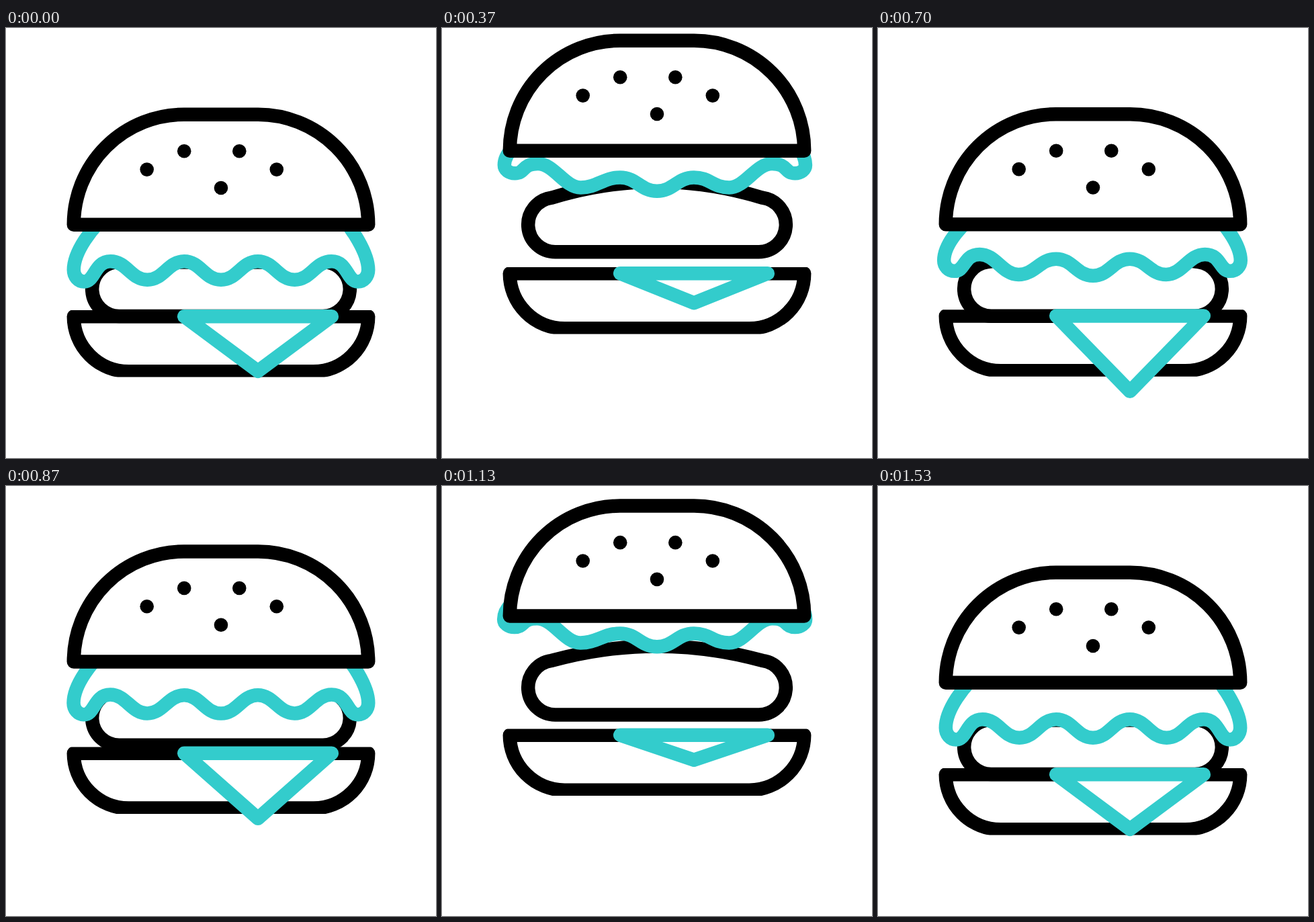
Recreate the animation shown at these times as an HTML page. Size 640 px wide and 640 px high, loop 2 s.

```html
<!DOCTYPE html>
<html>
<head>
<meta charset="utf-8">
<style>
  html, body { margin: 0; height: 100%; overflow: hidden; background: #fff; }
  svg { display: block; width: 100vw; height: 100vh; }
  .line { fill: #fff; stroke: #000; stroke-width: 20.5; stroke-linejoin: round; }
  .teal { stroke: #33cccc; }
</style>
</head>
<body>
<svg viewBox="0 0 640 640">
  <clipPath id="trim"><rect y="420" width="640" height="99.6"/></clipPath>
  <g id="base">
    <path class="line" clip-path="url(#trim)"
      d="M100.8 429.3H539.2A82 82 0 0 1 457.4 511.2H182.6A82 82 0 0 1 100.8 429.3Z"/>
  </g>
  <path id="patty" class="line"/>
  <path id="cheese" class="line teal"/>
  <path id="lettuce" class="line teal"/>
  <g id="bun">
    <path class="line" d="M100.8 292.7A164 164 0 0 1 264.8 128.7H375.2A164 164 0 0 1 539.2 292.7Z"/>
    <circle cx="265.2" cy="183.3" r="10.3"/>
    <circle cx="347.3" cy="183.3" r="10.3"/>
    <circle cx="209.7" cy="210.6" r="10.3"/>
    <circle cx="402.8" cy="210.6" r="10.3"/>
    <circle cx="320" cy="238" r="10.3"/>
  </g>
</svg>
<script>
const LOOP = 2000, FPS = 30, START = 2;
const $ = id => document.getElementById(id);

// Two hops: up and down bound the first top, land parts the hops, end is the final rest.
const hops = {
  base:    { high: -64, up: 11, down: 11.1, land: 20.2, end: 43.6 },
  patty:   { high: -96, up: 11.3, land: 20.7, end: 43.4 },
  lettuce: { high: -136.5, up: 12.1, down: 12.7, land: 22.2, end: 44.7 },
  bun:     { high: -110, again: -99.3, up: 10, down: 11, land: 21.4, end: 46 },
  bulge:   { high: 24, up: 10, down: 16, land: 26, end: 46 },
  flare:   { high: 1, up: 13.4, down: 14, land: 24.9, end: 45.4 },
  droop:   { high: -44.5, dip: 35.5, up: 14, land: 22.2, end: 45.5 }
};

function ease(step, t0, t1, a, b) {
  const x = (step - t0) / (t1 - t0);
  return a + (b - a) * x * x * (3 - 2 * x);
}

function hop(step, { high, again = high, dip = 0, up, down = up, land, end }) {
  const mid = (land + end) / 2;
  if (step <= START || step >= end) return 0;
  if (step < up) return ease(step, START, up, 0, high);
  if (step < down) return high;
  if (step < land) return ease(step, down, land, high, dip);
  if (step < mid) return ease(step, land, mid, dip, again);
  return ease(step, mid, end, again, 0);
}

// Knots run from -4 (left tip) to 4 (right tip); flaring lifts and spreads the outer ones.
function knot(k, flare) {
  const n = Math.abs(k), tip = n === 4;
  const lift = [0, 8, -6, -15, -33][n];
  const spread = [0, 0, 1, 11, 5.5][n];
  const lean = n > 1 ? -3.5 : 0;
  return {
    x: 320 + Math.sign(k) * ((tip ? 203.5 : 54.8 * n) + spread * flare) + lean * flare,
    y: (tip ? 377.5 : n % 2 ? 347.3 : 374.8) + lift * flare,
    reach: tip ? 16 : 24
  };
}

function lettucePath(flare) {
  const first = knot(-4, flare), last = knot(4, flare);
  const left = first.x - 15.7, right = last.x + 15.7;
  const drop = 17.5 - 6 * flare, side = first.y - drop, bend = side + drop * 0.55;
  let d = `M160 270C125 297 ${left} ${side - 25} ${left} ${side}`
        + `C${left} ${bend} ${first.x - 9} ${first.y} ${first.x} ${first.y}`;
  for (let k = -3, a = first; k <= 4; k++) {
    const b = knot(k, flare);
    d += `C${a.x + a.reach} ${a.y} ${b.x - b.reach} ${b.y} ${b.x} ${b.y}`;
    a = b;
  }
  return d + `C${last.x + 9} ${last.y} ${right} ${bend} ${right} ${side}`
           + `C${right} ${side - 25} 515 297 490 270Z`;
}

const pattyPath = bulge =>
  `M168.5 429A40.5 40.5 0 0 1 163 348.4Q320 ${348.4 - 2 * bulge} 477 348.4A40.5 40.5 0 0 1 471.5 429Z`;

function draw(ms) {
  const step = Math.floor(ms * FPS / 1000 + 0.12);
  const at = name => hop(step, hops[name]);
  const lift = (id, y) => $(id).setAttribute("transform", `translate(0 ${y})`);

  for (const id of ["base", "patty", "lettuce", "bun"]) lift(id, at(id));
  lift("cheese", at("base"));
  $("patty").setAttribute("d", pattyPath(at("bulge")));
  $("cheese").setAttribute("d", `M265.2 429.3H484.8L375 ${510.8 + at("droop")}Z`);
  $("lettuce").setAttribute("d", lettucePath(at("flare")));
}

const start = performance.now();
function tick() {
  draw((performance.now() - start) % LOOP);
  requestAnimationFrame(tick);
}
tick();
</script>
</body>
</html>
```
